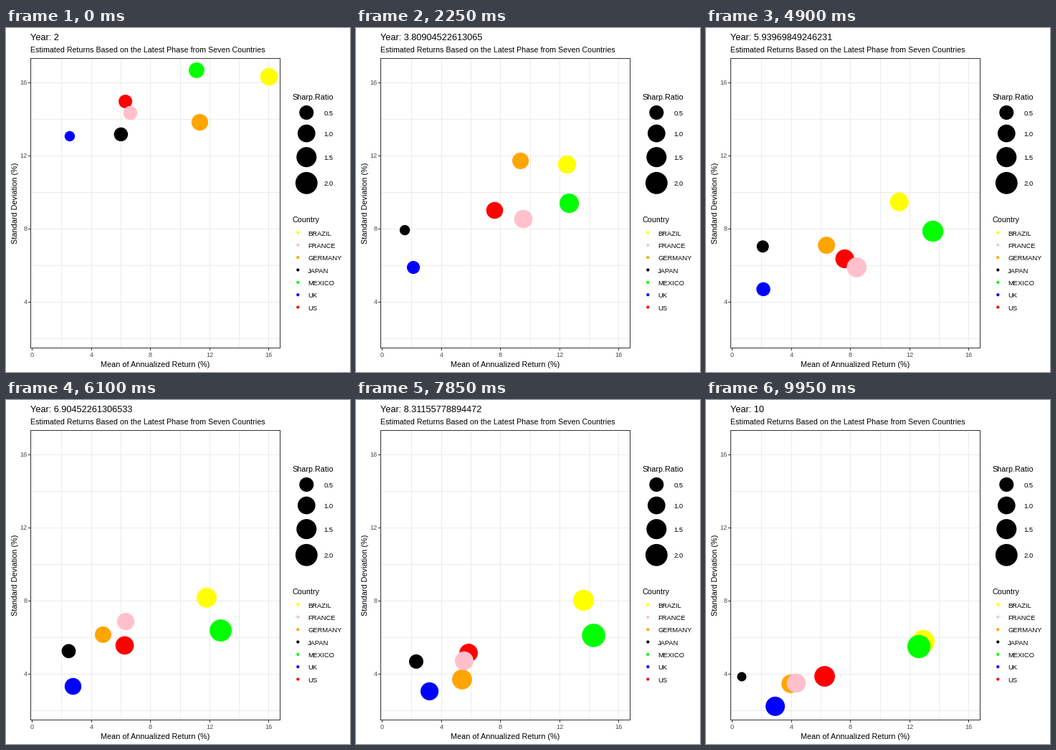
Write a matplotlib script that moves like this. It is 480 px wide and 480 px high and loops after 10000 ms.

```python
import math

import matplotlib.pyplot as plt
import numpy as np
from matplotlib.animation import FuncAnimation
from matplotlib.patches import Circle, Rectangle

SIZE, DPI = 480, 100
FRAMES, INTERVAL = 200, 50
LEFT, TOP, RIGHT, BOTTOM = 34, 41, 382, 445
X0, X_UNIT = 36.5, 20.65
Y16, Y_UNIT = 75.5, 25.5
GRID, DARK, GREY = "#EBEBEB", "#333333", "#4D4D4D"
COLORS = {"BRAZIL": "yellow", "FRANCE": "pink", "GERMANY": "orange",
          "JAPAN": "black", "MEXICO": "lime", "UK": "blue", "US": "red"}

# Mean return and standard deviation, in percent, at a few moments.
MOMENTS = np.array([0, 16, 45, 74, 122, 157, 199])
PATHS = {
    "US": ([6.3, 6.27, 7.6, 8.6, 6.25, 5.84, 6.25],
           [14.94, 11.59, 8.98, 7.43, 5.53, 5.12, 3.84]),
    "UK": ([2.54, 2.98, 2.11, 1.67, 2.76, 3.2, 2.91],
           [13.04, 8.18, 5.86, 5.94, 3.29, 3.02, 2.2]),
    "JAPAN": ([6, 3.63, 1.53, 1.62, 2.47, 2.3, 0.65],
              [13.14, 10.94, 7.9, 8.49, 5.22, 4.65, 3.82]),
    "GERMANY": ([11.33, 8.52, 9.35, 8.31, 4.79, 5.4, 3.95],
                [13.8, 10.67, 11.69, 8.37, 6.12, 3.67, 3.43]),
    "FRANCE": ([6.63, 6.39, 9.54, 10.15, 6.32, 5.54, 4.33],
               [14.31, 10.04, 8.51, 5.31, 6.84, 4.69, 3.47]),
    "BRAZIL": ([16, 14.53, 12.49, 11.43, 11.79, 13.61, 12.91],
               [16.29, 13.37, 11.49, 10.86, 8.14, 8, 5.75]),
    "MEXICO": ([11.11, 11.74, 12.64, 14.26, 12.74, 14.29, 12.62],
               [16.65, 12.92, 9.37, 9.27, 6.35, 6.08, 5.47]),
}

plt.rcParams["font.family"] = "Liberation Sans"
fig = plt.figure(figsize=(SIZE / DPI, SIZE / DPI), dpi=DPI, facecolor="white")
ax = fig.add_axes([0, 0, 1, 1])
ax.set_xlim(0, SIZE)
ax.set_ylim(SIZE, 0)
ax.axis("off")


def to_pixels(mean, sd):
    return X0 + X_UNIT * mean, Y16 + Y_UNIT * (16 - sd)


def radius(ratio):
    """The disc's area grows with the Sharpe ratio."""
    return 6 + 6.95 * math.sqrt(max(ratio - 0.165, 0))


def label(x, y, text, px, color="black", **kw):
    """Text on a baseline, with its size in pixels."""
    return ax.text(x, y, text, fontsize=px * 72 / DPI, color=color,
                   va="baseline", **kw)


def snap(col, row):
    """A point that always rounds to the given pixel."""
    return col + 0.2, row + 0.8


def line(start, end, color, z):
    ax.plot(*zip(snap(*start), snap(*end)), color=color, lw=72 / DPI,
            antialiased=False, solid_capstyle="butt", zorder=z)


def disc(x, y, r, color, z=3):
    return ax.add_patch(Circle((x, y), r, fc=color, lw=0, zorder=z))


def draw_panel():
    for value in range(0, 17, 2):
        x = int(to_pixels(value, 0)[0])
        line((x, TOP), (x, BOTTOM), GRID, 1)
        if value % 4 == 0:
            line((x, BOTTOM), (x, BOTTOM + 3), DARK, 2)
            label(x + 0.5, 459, str(value), 9.2, GREY, ha="center")
    for value in range(2, 17, 2):
        y = int(to_pixels(0, value)[1])
        line((LEFT, y), (RIGHT, y), GRID, 1)
        if value % 4 == 0:
            line((LEFT - 3, y), (LEFT, y), DARK, 2)
            label(29.5, y + 4, str(value), 9.2, GREY, ha="right")
    ax.add_patch(Rectangle(snap(LEFT, TOP), RIGHT - LEFT, BOTTOM - TOP,
                           fill=False, ec=DARK, lw=72 / DPI,
                           antialiased=False, zorder=6))
    label(208, 473, "Mean of Annualized Return (%)", 10.9, ha="center")
    label(16.3, 244, "Standard Deviation (%)", 10.9, ha="center",
          rotation=90, rotation_mode="anchor")
    label(34, 34, "Estimated Returns Based on the Latest Phase "
          "from Seven Countries", 10.66)


def draw_legends():
    label(399, 99.6, "Sharp.Ratio", 10.7)
    y = 118
    for ratio in (0.5, 1, 1.5, 2):
        r = radius(ratio)
        disc(419.3, y, r, "black")
        label(443.5, y + 4.2, f"{ratio:.1f}", 9.5)
        y += r + radius(ratio + 0.5) + 6.7
    label(399, 270.7, "Country", 10.8)
    for k, (name, color) in enumerate(COLORS.items()):
        y = 285.5 + 17.35 * k
        disc(407.3, y, 2.1, color)
        label(421.2, y + 4, name, 9.35)


draw_panel()
draw_legends()
title = label(34, 17, "Year: 2", 12.8)
discs = [disc(0, 0, 1, COLORS[name], 4 + k / 10)
         for k, name in enumerate(PATHS)]
stops = np.array(list(PATHS.values())).transpose(2, 0, 1)
slopes = np.gradient(stops, MOMENTS, axis=0)


def values_at(frame):
    """Smooth curve through all stops, one (mean, sd) row per country."""
    k = min(np.searchsorted(MOMENTS, frame, "right"), len(MOMENTS) - 1) - 1
    span = MOMENTS[k + 1] - MOMENTS[k]
    s = (frame - MOMENTS[k]) / span
    blend = s * s * (3 - 2 * s)
    bend = span * s * (1 - s)
    return (stops[k] * (1 - blend) + stops[k + 1] * blend
            + bend * ((1 - s) * slopes[k] - s * slopes[k + 1]))


def update(frame):
    year = 2 + 8 * frame / (FRAMES - 1)
    title.set_text(f"Year: {year:.15g}")
    for patch, (mean, sd) in zip(discs, values_at(frame)):
        patch.center = to_pixels(mean, sd)
        patch.radius = radius(mean / sd)
    return [title, *discs]


anim = FuncAnimation(fig, update, frames=FRAMES, interval=INTERVAL, repeat=True)
plt.show()
```
